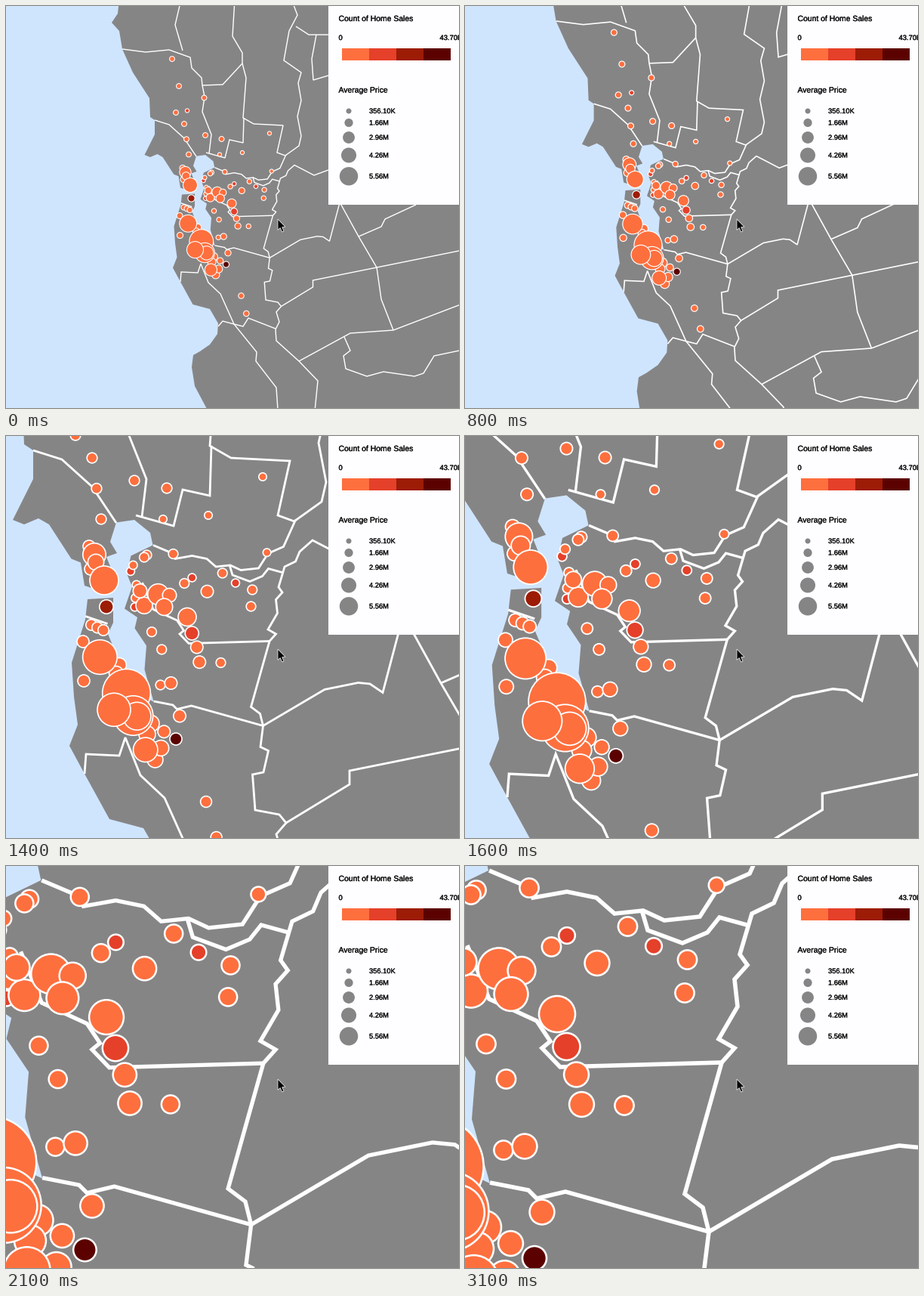
Write a matplotlib script that moves like this. It is 600 by 532 pixels and loops after 4000 ms.

```python
import numpy as np
import matplotlib.pyplot as plt
from matplotlib.animation import FuncAnimation
from matplotlib.patches import Circle, Polygon, Rectangle
from matplotlib.patheffects import withStroke
from matplotlib.transforms import Affine2D

W, H, DPI = 600, 532, 100
PX = 72 / DPI
FOCUS = np.array([358, 283])
LAND, WATER, PANEL, INK = "#868586", "#cfe5fe", "#fefdff", "#111111"
SCALE = ["#fe6f3e", "#e5402a", "#9d1c06", "#5b0200"]
RED, BROWN, DARK = 1, 2, 3

fig = plt.figure(figsize=(W / DPI, H / DPI), dpi=DPI)
ax = fig.add_axes([0, 0, 1, 1])
ax.set(xlim=(0, W), ylim=(H, 0))
ax.axis("off")
fig.patch.set_facecolor(LAND)

zoom = Affine2D()
on_map = zoom + ax.transData
borders, dots = [], []


def far(*xy):
    """Points in the zoomed-out view."""
    return np.reshape(xy, (-1, 2))


def near(*xy):
    """Points in the fully zoomed-in view, four times larger."""
    return FOCUS + (far(*xy) - FOCUS) / 4


def border(*parts):
    x, y = np.vstack(parts).T
    borders.extend(ax.plot(x, y, color="white", zorder=2, transform=on_map,
                           solid_joinstyle="miter", solid_capstyle="butt"))


def bubbles(radius, points, shade=0):
    for p in points:
        dots.append(ax.add_patch(Circle(
            p, radius, fc=SCALE[shade], ec="white", zorder=3,
            transform=on_map)))


def trail(start, end, n):
    return np.linspace(start, end, n)


# ocean and bay
coast = [
    far(150, -9, 148, 10, 140, 22, 150, 33, 154, 57, 168, 88, 190, 122,
        191, 147, 197, 151, 197, 170),
    near(-340, -61, -310, -49, -272, -65, -244, -49, -185, 42, -160, 52,
         -150, 113, -102, 129, -64, 107, -92, 37, -64, 27, -82, -3),
    near(-66, -54, -18, -61, 24, -27, 31, 6, -27, 34, -38, 81, -24, 116,
         -44, 174, -10, 197, -17, 226, 14, 272, 9, 335, 33, 420),
    near(18, 413, -62, 303, -88, 241, -74, 211, -74, 145, -142, 149,
         -148, 203, -184, 317, -178, 407, -168, 481, -190, 537, -150, 611,
         -84, 731),
    far(270, 401, 281, 420, 280, 434, 270, 448, 257, 457, 248, 462,
        246, 478, 250, 503, 267, 535, -20, 535, -20, -9),
]
ax.add_patch(Polygon(np.vstack(coast), fc=WATER, ec="none", zorder=1,
                     transform=on_map))

# northern borders
border(far(154, 57, 185, 61, 216, 58, 244, 68, 246, 82, 259, 95, 260, 105,
           263, 120, 260, 140, 272, 170, 269, 195))
border(far(232, -9, 224, 25, 234, 59))
border(far(260, 105, 287, 104, 313, 76, 313, 62, 300, 40, 303, -9))
border(far(313, 76, 318, 95, 314, 148, 328, 156, 367, 158, 359, 194,
           370, 198))
border(far(315, 148, 314, 181, 296, 177, 290, 201, 265, 194))
border(far(197, 151, 216, 157, 236, 175, 252, 199))
border(far(378, -9, 386, 12, 375, 33, 368, 72, 391, 88, 387, 102, 391, 125,
           386, 146, 391, 172, 388, 185, 370.5, 197.5))
border(far(384, 27, 401, 38, 427, 38))
border(far(411, 38, 405, 70, 407, 98, 427, 92))

# central borders
border(near(32, 6, 84, 28, 90, 42, 135, 34, 174, 42, 198, 63, 236, 59,
            264, 72, 311, 67, 336, 28, 377, 10, 409, -61))
border(near(234, 58, 242, 85, 288, 102, 321, 88, 337, 68, 377, 79))
border(near(340, 260, 357, 241, 336, 229, 361, 186, 357, 150, 374, 131,
            364, 117, 380, 63, 409, 49, 420, 23),
       far(382, 210.5, 408, 224, 427, 217))
border(near(3, 105, 32, 176, 95, 205, 113, 232, 102, 241, 126, 266,
            340, 260, 291, 434, 315, 452, 323, 484))
border(near(33, 419, 84, 429, 95, 440, 133, 431, 323, 484, 486, 388,
            575, 370, 606, 373, 640, 396), far(446, 245))
border(near(-148, 194, -89, 214))

# southern and eastern borders
border(near(323, 484, 316, 540, 337, 550, 324, 607, 295, 613),
       far(344, 389, 360, 392, 364.5, 397.5, 406.5, 372, 406.5, 363,
           491, 346, 610, 322))
border(far(364.5, 397.5, 358, 405, 362, 418, 357, 428, 358, 443, 388, 470,
           413, 496, 409, 536))
border(far(388, 470, 456, 433, 513, 429, 610, 392))
border(far(448, 438, 456, 456, 447, 463, 450, 480, 478, 490, 500, 484,
           541, 490, 553, 486, 567, 463, 610, 454))
border(far(440, 256, 467, 305, 491, 346, 497, 388, 513, 429))
border(far(467, 305, 497, 292, 502, 282, 543, 263))
border(far(231, 365, 232, 352, 254, 353, 258, 341, 268, 366, 284, 381,
           302, 421))
border(far(281, 424, 287, 417, 302, 421, 314, 424, 321, 413, 357, 427))
border(far(302, 421, 332, 458, 331, 470, 358, 505, 360, 534))

# home sales, grouped by average price
bubbles(3.4, far(220, 70, 229, 106, 225, 141, 262.5, 121.5, 264, 171,
                 285.5, 176))
bubbles(3.4, trail((236, 156), (242, 196.5), 3))
bubbles(3.7, far(311.5, 383.5, 318.3, 407))
bubbles(2.6, far(283, 196.5, 313, 194, 349, 168.5, 351.8, 218.6))
bubbles(2.6, far(240, 138.5), RED)

bubbles(3.6, trail((235.5, 266.5), (243.5, 270), 3))
bubbles(4, far(234, 214.5, 235, 229.5, 230, 277.5, 230.5, 303.5))
bubbles(4.7, far(254, 293, 252, 298.5))
bubbles(7.6, far(237.5, 220))
bubbles(5.3, far(238.5, 225))
bubbles(9.5, far(244, 237))
bubbles(11.4, far(241.2, 287.8))
bubbles(4.6, far(245.5, 254.5), BROWN)

bubbles(2.7, far(261.5, 231, 264.3, 254.7), RED)
bubbles(2.8, far(263.2, 227, 265.4, 240, 264.7, 248.7))
bubbles(3.15, near(15, 32, 8, 38, 85, 29, 114.5, 107, 215.5, 80, 294.5, 124,
                   291, 168, 211, 317, 28, 235.5, 54.5, 282, 51, 376))
bubbles(4.1, near(175, 128.5, 147.5, 276, 154.5, 315.5, 79, 371, 102, 458,
                  60.5, 499.5))
bubbles(5.5, near(8, 165.5))
bubbles(6.9, near(45, 136))
bubbles(4.6, near(75, 138.5, -3, 127))
bubbles(5.6, near(61, 169.5))
bubbles(6, near(122, 196))
bubbles(2.7, near(135, 92, 250, 106), RED)
bubbles(4.5, near(134.5, 239), RED)

bubbles(15.9, near(-39, 397.5))
bubbles(5.5, near(26, 478, 16, 506.5))
bubbles(13.1, near(-21, 457))
bubbles(9.2, near(-11, 458.5))
bubbles(11, near(-72, 441.5))
bubbles(5.2, near(37, 574, 52.5, 543))
bubbles(8.1, near(11.5, 547.5))
bubbles(4, near(92, 519), DARK)


def label(x, y, text, size):
    ax.text(x, y, text, size=size * PX, color=INK, zorder=6,
            family="Liberation Sans", va="baseline",
            path_effects=[withStroke(linewidth=0.3 * PX, foreground=INK)])


# legend
ax.add_patch(Rectangle((427, 0), 174, 263.4, fc=PANEL, ec="none", zorder=4))
label(440.5, 20, "Count of Home Sales", 10.4)
label(440.5, 45, "0", 9.4)
label(574.5, 45, "43.70K", 9.4)
for i, color in enumerate(SCALE):
    ax.add_patch(Rectangle((445 + 36 * i, 56), 36, 16, fc=color, ec="none",
                           zorder=5))
label(440.5, 114.5, "Average Price", 10.4)
for y, r, price in [(139, 3.5, "356.10K"), (154.5, 5.6, "1.66M"),
                    (174, 7.9, "2.96M"), (197.5, 10, "4.26M"),
                    (225.3, 12.2, "5.56M")]:
    ax.add_patch(Circle((454, y), r, fc=LAND, ec="none", zorder=5))
    label(481, y + 3, price, 9.3)

# mouse pointer
ax.add_patch(Polygon([(360, 282), (360, 296.5), (363.2, 293.6), (365.6, 299),
                      (368, 298), (365.7, 292.7), (370, 292.3)],
                     fc="black", ec="#e8e8e8", lw=0.8 * PX, zorder=7))

# zoom level (log2) at key ticks of 100 ms
TICKS = [0, 6, 8, 11, 14, 18, 21, 23, 31]
LEVELS = [0, .115, .219, .592, 1, 1.5, 1.931, 1.99, 2]


def draw(i):
    k = 2 ** np.interp(i, TICKS, LEVELS)
    zoom.clear().translate(*-FOCUS).scale(k).translate(*FOCUS)
    for line in borders:
        line.set_linewidth(1.4 * k * PX)
    for dot in dots:
        dot.set_linewidth(1.05 * k ** 0.65 * PX)
    return borders + dots


anim = FuncAnimation(fig, draw, frames=40, interval=100, repeat=True)
plt.show()
```
